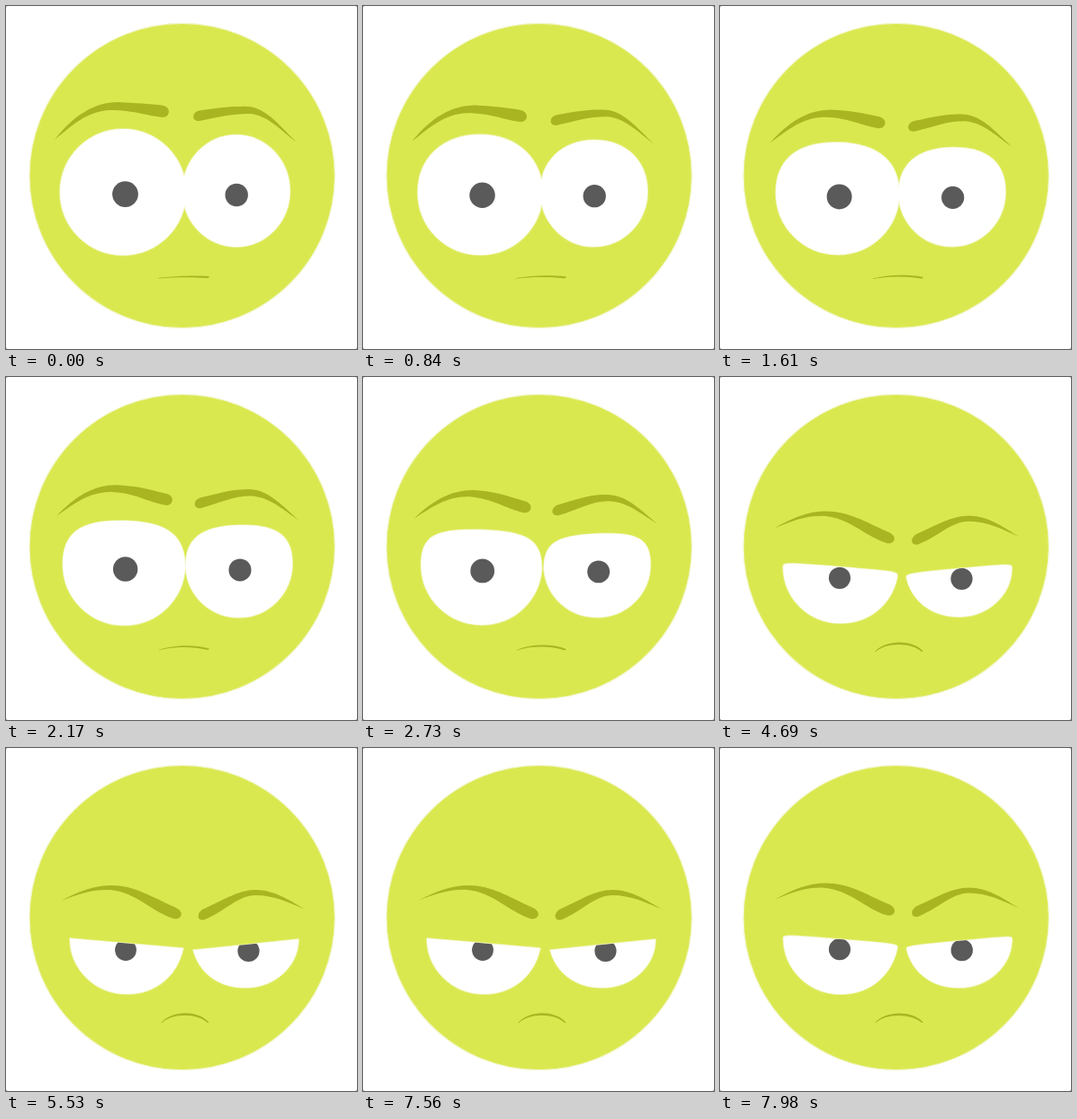
An HTML page that plays this animation: 390 px wide and 382 px high, repeating every 8000 ms.

```html
<!DOCTYPE html>
<html lang="en">
<head>
<meta charset="utf-8">
<title>Frowning face</title>
<style>
html, body { margin: 0; width: 100%; height: 100%; overflow: hidden; background: #888; }
svg { display: block; width: 390px; height: 382px; background: #fff; border-radius: 2px; }
</style>
</head>
<body>
<svg viewBox="0 0 390 382">
  <defs>
    <clipPath id="clipL"><path class="eyeL"/></clipPath>
    <clipPath id="clipR"><path class="eyeR"/></clipPath>
  </defs>
  <circle cx="195.7" cy="189" r="169.7" fill="#dae850" stroke="#f2f6c8" stroke-width="1.2"/>
  <g fill="#fff" stroke="#edf3ac" stroke-width="1.6">
    <path class="eyeL"/><path class="eyeR"/>
  </g>
  <g fill="#fff"><path class="eyeL"/><path class="eyeR"/></g>
  <g fill="#5a5a5a">
    <g clip-path="url(#clipL)"><circle id="pupilL"/></g>
    <g clip-path="url(#clipR)"><circle id="pupilR"/></g>
  </g>
  <g fill="#a9b521">
    <path id="browL"/><path id="browR"/><path id="mouth"/>
  </g>
</svg>
<script>
const LOOP = 8000, STEP = 70;
const $ = id => document.getElementById(id);
const mix = (a, b, p) => a + (b - a) * p;
const mixPt = (a, b, p) => [mix(a[0], b[0], p), mix(a[1], b[1], p)];

// Calm and frowning outlines with matching points
const shapes = {
  browL: [
    'M54 149C75 122 98 107 125 107C143 108 160 109 173 110.5C184 112 183 124 174 124C155 122 142 116 116 116C90 117 75 132 54 149Z',
    'M61 170C80 160 98 153 117 153C143 153 160 165 189 178C199 183 195 192 186 190C160 181 145 161 116 158C95 157 80 163 61 170Z'],
  browR: [
    'M215 116.5C232 114 245 112 262 112C286 110 300 129 323 152C305 138 290 121 270 120C250 120 235 124 215 128C206 129 206 118 215 116.5Z',
    'M220 179C240 170 258 158 277 158C298 158 314 169 333 180C314 172 298 164 277 164C258 164 243 182 221 191C213 194 210 184 220 179Z'],
  mouth: [
    'M169 303C185 301 208 300 225 301C227 302 225 303 223 303C208 302 185 302 169 303.5Z',
    'M172.5 306C184 292 213 291.5 225 305C226 306 225 306.5 224 306C213 295 184 294.5 173 306.5Z']
};

function morph([from, to], p) {
  const end = to.match(/[\d.]+/g);
  let i = 0;
  return from.replace(/[\d.]+/g, n => mix(+n, +end[i++], p).toFixed(2) + ' ');
}

// Eye corners and bottom: an ellipse when calm, a half disc under a slanted lid when frowning
const eyes = {
  L: { left: [[60, 207.3], [71, 212]], right: [[200, 207.3], [197, 223]], bottom: [[130, 277.6], [134, 274]],
       top: 137, lean: [0, -6], pupil: [[132.5, 209.6, 14.4], [133, 225, 11.9]] },
  R: { left: [[196, 206], [208, 225]], right: [[315.5, 206], [325, 213]], bottom: [[256, 268.2], [266, 267]],
       top: 143.5, lean: [6, 0], pupil: [[256.2, 210.5, 12.7], [269.5, 226, 12.1]] }
};

function eyePath(e, p) {
  const l = mixPt(...e.left, p), r = mixPt(...e.right, p), b = mixPt(...e.bottom, p);
  const cl = [l[0], mix(e.top, e.left[1][1], p)], cr = [r[0], mix(e.top, e.right[1][1], p)];
  const t = mixPt(cl, cr, .5);
  const k = .552 + .4 * Math.min(1, p * 1.35), q = .552;
  const low = (c, lean) => [c[0] + lean * p, mix(c[1], b[1], q)];
  const side = c => [mix(b[0], c[0], q), b[1]];
  return `M${l}C${mixPt(l, cl, k)} ${mixPt(t, cl, k)} ${t}` +
    `C${mixPt(t, cr, k)} ${mixPt(r, cr, k)} ${r}` +
    `C${low(r, e.lean[1])} ${side(r)} ${b}` +
    `C${side(l)} ${low(l, e.lean[0])} ${l}Z`;
}

// Frown over time: [seconds, amount, speed]
const keys = [[0, 0, .06], [1.61, .185, .16], [2.73, .412, .25],
  [3.64, .68, .28], [4.69, .925, .16], [5.53, 1, 0]];

function frown(s) {
  if (s >= 5.53) return 1 - .23 * Math.max(0, s - 7.49) ** 2;
  const i = keys.findIndex(k => k[0] > s);
  const [t0, a, va] = keys[i - 1], [t1, b, vb] = keys[i];
  const d = t1 - t0, u = (s - t0) / d, v = 1 - u;
  return v * v * ((1 + 2 * u) * a + u * d * va) + u * u * ((3 - 2 * u) * b - v * d * vb);
}

function draw(ms) {
  const p = frown(Math.floor(ms / STEP) * STEP / 1000);
  for (const id in shapes) $(id).setAttribute('d', morph(shapes[id], p));
  for (const id in eyes) {
    const d = eyePath(eyes[id], p), [from, to] = eyes[id].pupil;
    document.querySelectorAll('.eye' + id).forEach(el => el.setAttribute('d', d));
    ['cx', 'cy', 'r'].forEach((name, i) => $('pupil' + id).setAttribute(name, mix(from[i], to[i], p)));
  }
}

const start = performance.now();
function tick() {
  draw((performance.now() - start) % LOOP);
  requestAnimationFrame(tick);
}
tick();
</script>
</body>
</html>
```
